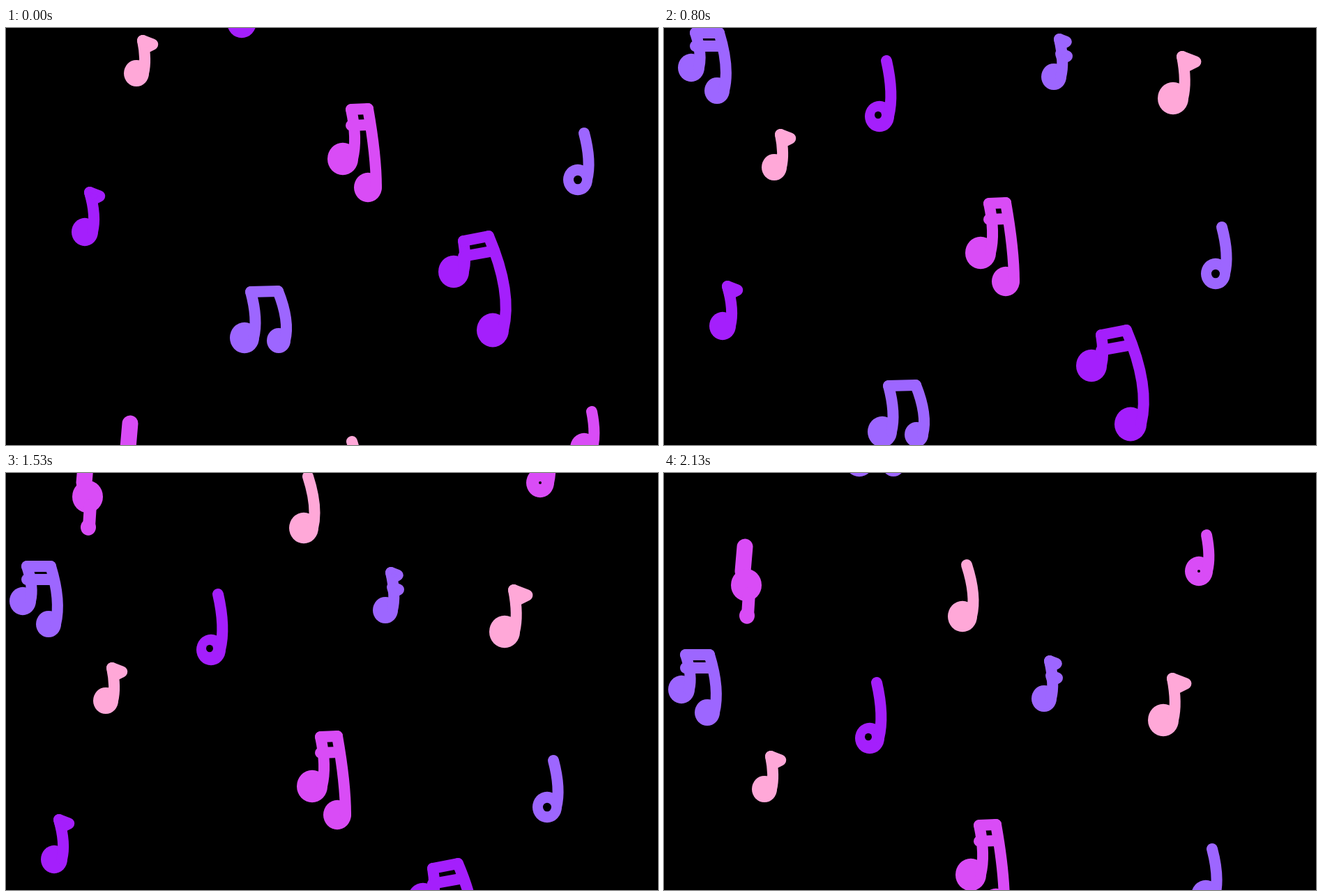
These frames come from a looping animation (935x599 px, 2.19 s). An HTML page with a canvas:

```html
<!DOCTYPE html>
<html>
<head>
<meta charset="utf-8">
<title>Drifting notes</title>
<style>
html, body { margin: 0; width: 100%; height: 100%; overflow: hidden; background: #000; }
canvas { display: block; }
</style>
</head>
<body>
<canvas id="stage" width="935" height="599"></canvas>
<script>
const ctx = document.getElementById('stage').getContext('2d');
const PINK = '#ffa8d8', MAGENTA = '#d94cf6', VIOLET = '#9d66ff', PURPLE = '#a41ffc', BLACK = '#000';
const LOOP = 2190, TICK = 1000 / 15;
const STEM = 16, SWAY = 30, SWING_TICKS = 4;
const TILE = { x: 19, y: 851 };

// The field rests here (tick, x, y) and swings to the right in between.
const RESTS = [
  [0, 0, 0], [8, -4, 63], [12, -29, 135], [19, -35, 211], [20, -35, 211],
  [23, -44, 262], [27, -50, 348], [32, -43, 389], [33, -43, 389]
];

function ink(color) {
  ctx.fillStyle = ctx.strokeStyle = color;
}

function dot(x, y, r, ry = r * 1.06) {
  ctx.beginPath();
  ctx.ellipse(x, y, r, ry, 0, 0, 2 * Math.PI);
  ctx.fill();
}

function line(width, ...points) {
  ctx.lineWidth = width;
  ctx.beginPath();
  for (const p of points) ctx.lineTo(p.x, p.y);
  ctx.stroke();
  ctx.fill();
}

const shift = (p, x, y) => ({ x: p.x + x, y: p.y + y });

// Head with a curved stem on its right side; returns the top of the stem.
function note(x, y, r, height, lean, bulge = height / 10) {
  const foot = x + r - STEM / 2;
  const top = { x: foot - lean, y: y - height };
  dot(x, y, r);
  ctx.lineWidth = STEM;
  ctx.beginPath();
  ctx.moveTo(foot, y);
  ctx.quadraticCurveTo(foot + bulge, y - height * 0.4, top.x, top.y);
  ctx.stroke();
  return top;
}

function flag(top, size) {
  line(STEM, top, shift(top, 13 * size, 5 * size), shift(top, 3 * size, 10 * size), top);
}

function beam(a, b, gap = 0) {
  line(STEM, a, b);
  if (gap) line(STEM, shift(a, 0, gap), shift(b, 3, gap));
}

function hole(x, y, r) {
  ink(BLACK);
  dot(x, y, r);
}

function clef(x, y) {
  line(23, { x: x - 2, y: y - 55 }, { x: x - 5, y: y - 20 });
  dot(x, y, 22);
  line(18, { x: x + 4, y: y + 12 }, { x: x + 2, y: y + 43 });
  dot(x + 1, y + 44, 11);
}

function drawNotes() {
  ink(PINK);
  flag(note(187, 65, 18, 47, 1), 1.1);
  flag(note(759, -34, 22, 60, 1), 1.5);
  note(471, -183, 21, 74, 7);

  ink(MAGENTA);
  beam(note(483, 188, 22, 71, 2), note(519, 229, 20, 113, 12, 0), 23);
  clef(161, -228);
  note(810, -248, 20, 52, 1);
  hole(810, -248, 2);

  ink(VIOLET);
  beam(note(342, 445, 21, 66, 4), note(391, 449, 17, 71, 10));
  beam(note(68, -78, 19, 50, 5), note(105, -45, 18, 83, 7), 19);
  const top = note(588, -65, 18, 54, 2);
  flag(top, 0.75);
  flag(shift(top, 2, 21), 0.7);
  note(820, 218, 21, 67, 4);
  hole(820, 218, 6);

  ink(PURPLE);
  flag(note(113, 293, 19, 57, 4), 1.1);
  beam(note(642, 350, 22, 44, 0), note(698, 434, 23, 135, 21), 22);
  note(338, -8, 21, 80, 3);
  hole(336, -10, 5);
}

function fieldOffset(tick) {
  const i = RESTS.findLastIndex(rest => rest[0] <= tick);
  const [t0, x0, y0] = RESTS[i];
  const [t1, x1, y1] = RESTS[i + 1];
  const p = (tick - t0) / (t1 - t0);
  const swings = Math.round((t1 - t0) / SWING_TICKS);
  const sway = SWAY / 2 * (1 - Math.cos(2 * Math.PI * swings * p));
  return [x0 + (x1 - x0) * p + sway, y0 + (y1 - y0) * p];
}

function draw(now) {
  const tick = Math.floor((now % LOOP + 4) / TICK);
  const [x, y] = fieldOffset(tick);
  ctx.fillStyle = BLACK;
  ctx.fillRect(0, 0, 935, 599);
  for (let n = -1; n <= 1; n++) {
    ctx.save();
    ctx.translate(x + n * TILE.x, y + n * TILE.y);
    drawNotes();
    ctx.restore();
  }
}

ctx.lineCap = ctx.lineJoin = 'round';
const start = performance.now();
function frame() {
  draw(performance.now() - start);
  requestAnimationFrame(frame);
}
frame();
</script>
</body>
</html>
```
